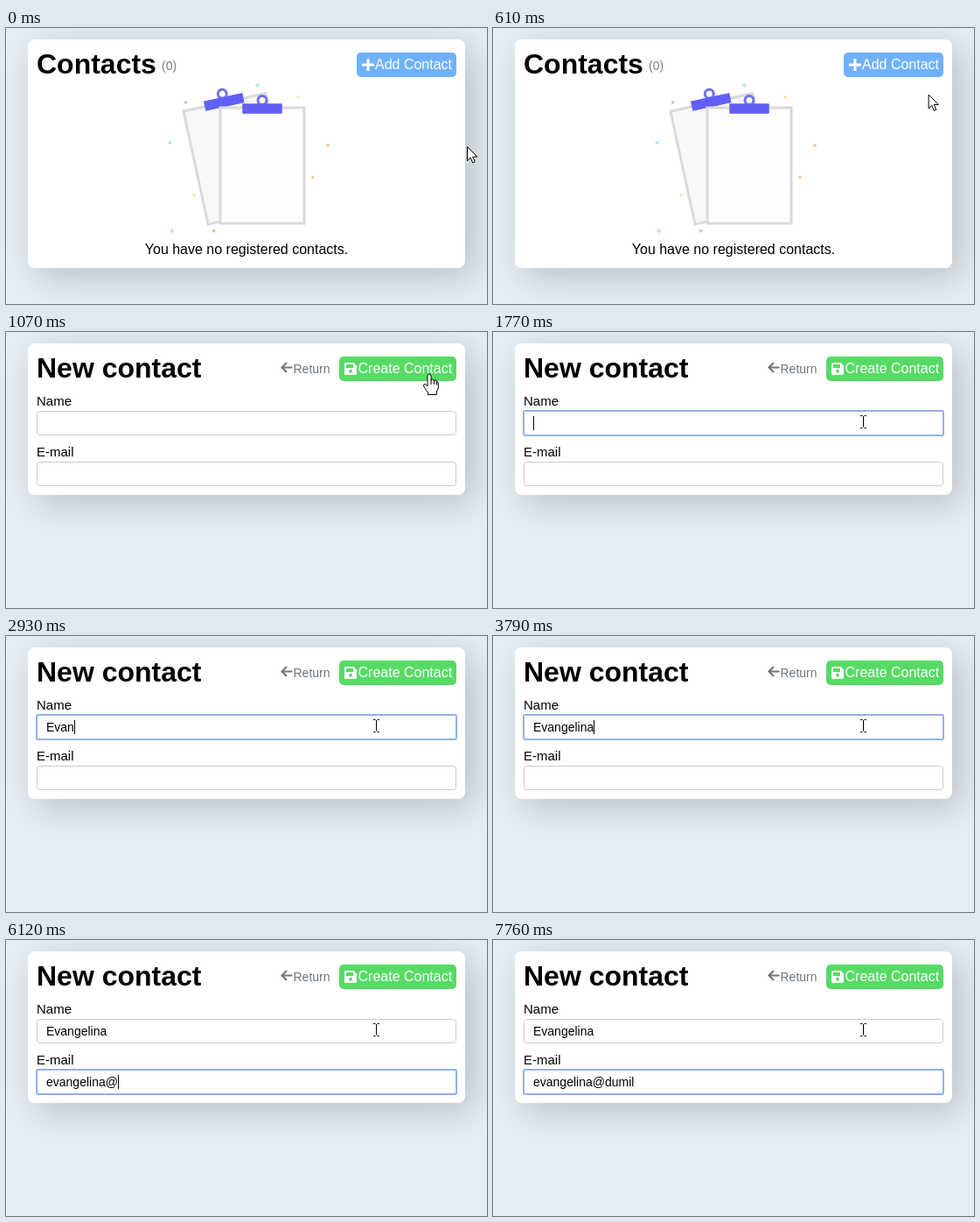
An HTML page with a canvas for the animation above (7.99 s loop, 550 by 315 pixels).

```html
<!DOCTYPE html>
<html lang="en">
<head>
<meta charset="utf-8">
<title>Contacts</title>
<style>
  html, body { margin: 0; width: 100%; height: 100%; overflow: hidden; background: #e6eef5; }
  canvas { display: block; }
</style>
</head>
<body>
<canvas id="stage" width="550" height="315"></canvas>
<script>
const ctx = document.getElementById('stage').getContext('2d');
const LOOP = 7990, BLINK = 550, STEP = 76.6;
const OPEN_FORM = 1070, FOCUS_NAME = 1620, FOCUS_MAIL = 4020;
const FONT = '"Liberation Sans", Arial, sans-serif';

const nameField = {
  label: 'Name', y: 90, value: 'Evangelina',
  keys: [2330, 2490, 2640, 2800, 2950, 3180, 3410, 3560, 3710, 3790]
};
const mailField = {
  label: 'E-mail', y: 148, value: 'evangelina@dumil',
  keys: [4480, 4640, 4800, 5030, 5180, 5260, 5410, 5660, 5890, 5890, 6120,
         6580, 6660, 6810, 6890, 7210]
};

function text(str, x, y, size, color = '#000', weight = '') {
  ctx.font = `${weight} ${size}px ${FONT}`;
  ctx.fillStyle = color;
  ctx.fillText(str, x, y);
}

function box(x, y, w, h, r, fill, stroke) {
  ctx.beginPath();
  ctx.roundRect(x, y, w, h, r);
  if (fill) { ctx.fillStyle = fill; ctx.fill(); }
  if (stroke) { ctx.strokeStyle = stroke; ctx.stroke(); }
}

function line(color, width, ...pts) {
  ctx.strokeStyle = color;
  ctx.lineWidth = width;
  ctx.beginPath();
  pts.forEach(([x, y]) => ctx.lineTo(x, y));
  ctx.stroke();
  ctx.lineWidth = 1;
}

function disc(x, y, r, color) {
  ctx.fillStyle = color;
  ctx.beginPath();
  ctx.arc(x, y, r, 0, Math.PI * 2);
  ctx.fill();
}

function card(height) {
  ctx.fillStyle = '#e6eef5';
  ctx.fillRect(0, 0, 550, 315);
  ctx.save();
  ctx.shadowColor = 'rgba(0,0,0,.2)';
  ctx.shadowBlur = 40;
  ctx.shadowOffsetX = ctx.shadowOffsetY = 10;
  box(25, 13, 500, height, 8, '#fff');
  ctx.restore();
}

// Sheet with a purple clip; the origin is the sheet's top left corner.
function clipboard(x, y, angle, w, h, fill, clipX, clipY) {
  const edge = '#d9dade', purple = '#625ff6';
  ctx.save();
  ctx.translate(x, y);
  ctx.rotate(angle);
  ctx.lineWidth = 3;
  box(0, 0, w, h, 0, fill, edge);
  ctx.fillStyle = purple;
  ctx.fillRect(clipX, clipY, 45, 11);
  ctx.strokeStyle = '#6f70ea';
  ctx.beginPath();
  ctx.arc(clipX + 22.5, clipY - 4, 5, 0, Math.PI * 2);
  ctx.stroke();
  ctx.fillStyle = purple;
  ctx.fillRect(clipX, clipY, 45, 11);
  ctx.restore();
}

function sparkles() {
  disc(205.5, 85, 1.8, '#a3d5dc');
  disc(334, 78.5, 1.7, '#f6e6a8');
  disc(187.5, 131, 1.8, '#a9e3f0');
  disc(368, 134, 1.8, '#e3c3a4');
  disc(351, 170.5, 1.7, '#ecc9a6');
  disc(215, 191, 1.7, '#f3e3a2');
  disc(237.5, 231.5, 1.9, '#efc4a0');
  for (const [x, y] of [[287.5, 65.5], [189.5, 231.5]]) {
    line('#a9dfe6', 1.3, [x - 2.5, y], [x + 2.5, y]);
    line('#a9dfe6', 1.3, [x, y - 2.5], [x, y + 2.5]);
  }
}

function listPage() {
  card(261);
  text('Contacts', 35, 52, 32, '#000', 'bold');
  text('(0)', 178, 48, 14, '#7a7a7a');
  box(401, 28, 114, 28, 5, '#70b1fb');
  line('#fff', 3, [407, 42], [421, 42]);
  line('#fff', 3, [414, 35], [414, 49]);
  text('Add Contact', 422, 47, 16, '#fff');
  sparkles();
  clipboard(203, 95, -0.214, 96, 132, '#f8f8f9', 25, -6);
  clipboard(245, 91, 0, 96, 132, '#fdfdfd', 25.5, -4.5);
  ctx.textAlign = 'center';
  text('You have no registered contacts.', 275, 258, 16);
  ctx.textAlign = 'left';
}

function saveIcon(x, y, back) {
  ctx.fillStyle = '#fff';
  ctx.beginPath();
  ctx.moveTo(x + 1.5, y);
  ctx.lineTo(x + 10.5, y);
  ctx.lineTo(x + 14, y + 3.5);
  ctx.lineTo(x + 14, y + 12.5);
  ctx.arcTo(x + 14, y + 14, x + 12, y + 14, 1.5);
  ctx.lineTo(x + 1.5, y + 14);
  ctx.arcTo(x, y + 14, x, y + 12, 1.5);
  ctx.lineTo(x, y + 1.5);
  ctx.arcTo(x, y, x + 2, y, 1.5);
  ctx.fill();
  ctx.fillStyle = back;
  ctx.fillRect(x + 2, y + 2, 8, 4);
  disc(x + 7, y + 9.8, 2, back);
}

function field({ label, y, value, keys }, t, focusAt, focused) {
  text(label, 35, y - 6, 15);
  if (focused) {
    ctx.lineWidth = 2;
    box(35, y, 480, 28, 2, '#fff', '#8fb2ea');
    ctx.lineWidth = 1;
  } else {
    box(35.5, y + .5, 479, 27, 3, '#fff', '#ccc');
  }
  const pressed = keys.filter(k => t >= k);
  const typed = value.slice(0, pressed.length);
  text(typed, 46, y + 19, 14);
  const last = pressed.length ? pressed[pressed.length - 1] : focusAt;
  if (focused && (t - last) % (2 * BLINK) < BLINK) {
    ctx.fillRect(Math.round(46 + ctx.measureText(typed).width), y + 6, 1, 16);
  }
}

function formPage(t) {
  const green = '#58da66', gray = '#6c757d';
  card(173);
  text('New contact', 35, 52, 32, '#000', 'bold');
  line(gray, 2, [315.5, 40.5], [327.5, 40.5]);
  line(gray, 2, [321, 35], [315.5, 40.5], [321, 46]);
  text('Return', 328.5, 47, 14, gray);
  box(381, 28, 134, 28, 5, green);
  saveIcon(387, 35, green);
  text('Create Contact', 402.5, 47, 16, '#fff');
  field(nameField, t, FOCUS_NAME, t >= FOCUS_NAME && t < FOCUS_MAIL);
  field(mailField, t, FOCUS_MAIL, t >= FOCUS_MAIL);
}

const arrow = new Path2D('M.5 .5V16.5L4.2 13L6.7 18.8L9.2 17.8L6.7 12H11.8Z');
const hand = new Path2D('M-2 13V2Q-2 0 0 0T2 2V7.5Q2 6 3.6 6T5.4 8Q5.6 6.8 7 7T8.4 9' +
  'Q10 8 10.3 10V15Q10 18 8.4 20V23.5H-1.5V21Q-4 18 -6.3 14Q-7 11.5 -5 11.5Q-3.5 11.7 -2 14Z');
const beam = new Path2D('M-3 -6.5H-.5M1.5 -6.5H4M.5 -6V6.5M-3 7.5H-.5M1.5 7.5H4');

function pointer(t) {
  const n = Math.floor((t - 300) / STEP);
  if (n < 0) return [527, 135, arrow];
  if (n <= 10) {
    const u = Math.min(1, (n + 1) / 8), p = u * u * (3 - 2 * u);
    const x = 527 - 43 * p, y = 135 - 87 * p;
    return [x, y, y < 56 && x < 515 ? hand : arrow];
  }
  const u = Math.min(1, (n - 10) / 5), p = u * (2 - u);
  const x = Math.round(484 - 61 * p), y = Math.round(48 + 54 * p);
  return [x, y, y >= 90 ? beam : arrow];
}

function drawPointer(t) {
  const [x, y, shape] = pointer(t);
  const clicking = (t >= 910 && t < OPEN_FORM) || (t >= 1540 && t < 1700);
  if (clicking) disc(x - 1, y + 1, 12, 'rgba(245,228,15,.62)');
  ctx.save();
  ctx.translate(x, y);
  ctx.lineJoin = 'round';
  ctx.strokeStyle = '#000';
  if (shape !== beam) {
    ctx.fillStyle = '#fff';
    ctx.fill(shape);
  }
  ctx.stroke(shape);
  if (shape === hand) {
    line('#000', 1, [2, 7], [2, 12]);
    line('#000', 1, [5.4, 8], [5.4, 12]);
    line('#000', 1, [8.4, 9], [8.4, 12.5]);
  }
  ctx.restore();
}

const start = performance.now();
function draw() {
  const t = (performance.now() - start) % LOOP;
  if (t < OPEN_FORM) listPage();
  else formPage(t);
  drawPointer(t);
  requestAnimationFrame(draw);
}
draw();
</script>
</body>
</html>
```
